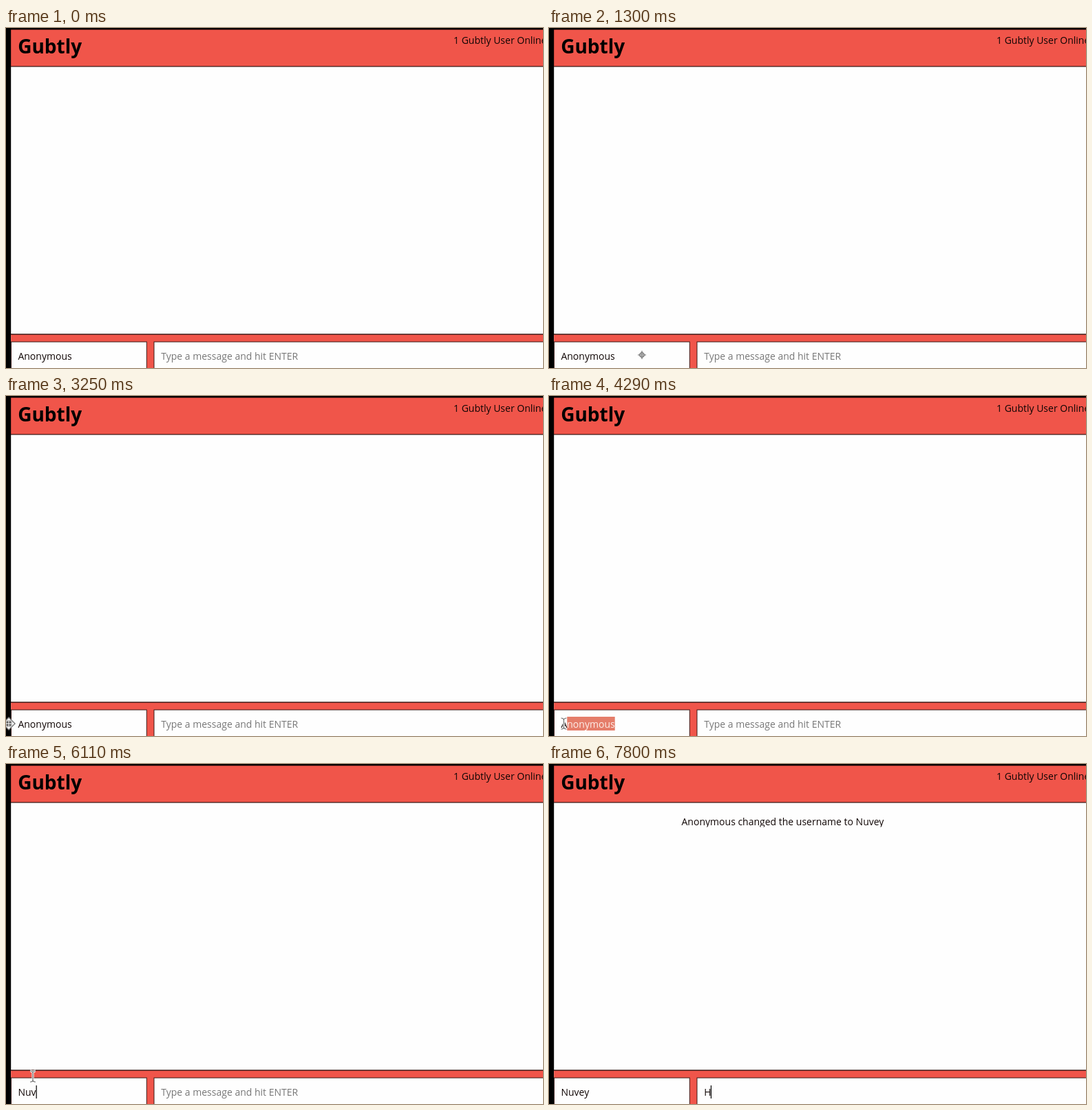
An HTML page that plays this animation: 780 px wide and 494 px high, repeating every 8000 ms.

```html
<!DOCTYPE html>
<html lang="en">
<head>
<meta charset="utf-8">
<title>Chat demo</title>
<style>
  html, body { margin: 0; width: 100%; height: 100%; overflow: hidden; background: #000; }
  svg { display: block; width: 780px; height: 494px; }
  text { font: 14px "Open Sans", "Noto Sans", sans-serif; fill: #100605; white-space: pre; }
  .title { font-size: 28px; font-weight: 700; fill: #000; }
  .hint { fill: #777; }
  .picked { fill: #fdeee9; }
  .bar { fill: #f0554a; }
  .rule { stroke: #3b1a17; stroke-width: 1.4; }
  .field { fill: #fefefe; stroke: #3b1a17; }
  .halo { fill: none; stroke: #fff; stroke-width: 3; }
  .ink { fill: none; stroke: #6b6b6b; stroke-width: 1.2; }
</style>
</head>
<body>
<svg viewBox="0 0 780 494">
  <clipPath id="line"><rect x="180" y="70" width="330" height="21.5"/></clipPath>

  <rect x="7.2" y="56" width="773" height="438" fill="#fefefe"/>
  <rect class="bar" x="7.2" y="2.5" width="773" height="53.5"/>
  <path class="rule" d="M7 55.9H780"/>
  <text class="title" x="17.2" y="36.5">Gubtly</text>
  <text x="650" y="22.5">1 Gubtly User Online</text>

  <text id="notice" x="192.5" y="88.5" clip-path="url(#line)">Anonymous changed the username to Nuvey</text>

  <rect class="bar" x="7.2" y="445" width="773" height="49"/>
  <path class="rule" d="M7 445H780"/>
  <rect class="field" x="7.5" y="456" width="196.8" height="60"/>
  <rect class="field" x="215" y="456" width="600" height="60"/>

  <rect id="selection" y="466" height="20" fill="#e57d6a"/>
  <text id="name" x="17.4" y="481.7"><tspan id="plain"></tspan><tspan id="picked" class="picked"></tspan></text>
  <text id="message" x="225.2" y="481.7"></text>
  <rect id="caret" y="467" width="1.2" height="19" fill="#000"/>

  <g id="cross">
    <path class="ink" d="M-6 0H6M0 -6V6"/>
    <circle class="ink" r="3.2"/>
  </g>
  <g id="move">
    <path d="M0 -10L10 0L0 10L-10 0Z" fill="#777"/>
    <path d="M0 -8L3 -5H-3ZM0 8L3 5H-3ZM-8 0L-5 -3V3ZM8 0L5 -3V3Z" fill="#fff"/>
    <path d="M-4 -4H4V4H-4Z" fill="#555" stroke="#fff"/>
    <path d="M-4 0H4M0 -4V4" stroke="#fff"/>
  </g>
  <g id="beam">
    <path class="halo" d="M-4 -8Q0 -8 0 -5Q0 -8 4 -8M0 -5V5M-4 8Q0 8 0 5Q0 8 4 8"/>
    <path class="ink" d="M-4 -8Q0 -8 0 -5Q0 -8 4 -8M0 -5V5M-4 8Q0 8 0 5Q0 8 4 8"/>
  </g>
</svg>
<script>
const LOOP = 8000, STEP = 130, NAME_X = 17.4, MESSAGE_X = 225;
const OLD_NAME = "Anonymous", NEW_NAME = "Nuvey", HINT = "Type a message and hit ENTER";
const $ = id => document.getElementById(id);
const show = (el, on) => el.setAttribute("visibility", on ? "visible" : "hidden");

// Pointer path: time, x, y, shape ("" hides it)
const path = [
  [0, 300, 510, ""], [520, 300, 510, "cross"], [1300, 135, 475, "cross"],
  [1560, 135, 475, "cross"], [1950, 108, 476, "cross"], [2730, 108, 476, "cross"],
  [3250, 4, 476, "move"], [3380, 4, 476, "beam"], [3770, 97, 476, "beam"],
  [4290, 21.5, 476, "beam"], [4680, 15, 476, "beam"], [5070, 15, 476, ""],
  [5850, 20, 476, "beam"], [6110, 39, 454, "beam"], [6240, 39, 454, ""]
];

function pointerAt(t) {
  const i = path.findLastIndex(p => p[0] <= t);
  const a = path[i], b = path[i + 1] || a;
  const k = b === a ? 0 : (t - a[0]) / (b[0] - a[0]);
  return { x: a[1] + (b[1] - a[1]) * k, y: a[2] + (b[2] - a[2]) * k, shape: a[3] };
}

const typed = t => NEW_NAME.slice(0, Math.max(0, Math.floor((t - 5850) / STEP) + 1));
const widthOf = (el, n) => n ? el.getSubStringLength(0, n) : 0;

function setText(el, value) {
  if (el.textContent !== value) el.textContent = value;
}

function drawName(t, pointer) {
  const name = $("name"), box = $("selection");
  const text = t < 5070 ? OLD_NAME : typed(t);
  let from = text.length;
  setText($("plain"), text);
  setText($("picked"), "");
  if (t >= 3770 && t < 5070) {
    // A letter joins the selection once the pointer is well past its middle
    const edge = n => NAME_X + widthOf(name, n - 1) * 0.6 + widthOf(name, n) * 0.4;
    from = 0;
    while (from < text.length && edge(from + 1) < pointer.x) from++;
  }
  const start = widthOf(name, from), end = widthOf(name, text.length);
  box.setAttribute("x", NAME_X + start);
  box.setAttribute("width", end - start);
  setText($("plain"), text.slice(0, from));
  setText($("picked"), text.slice(from));
  return NAME_X + end;
}

function render(now) {
  const t = Math.floor(now % LOOP / STEP) * STEP;
  const pointer = pointerAt(t);
  const nameEnd = drawName(t, pointer);

  const message = $("message"), sent = t >= 7800;
  setText(message, sent ? "H" : HINT);
  message.setAttribute("class", sent ? "" : "hint");
  show($("notice"), t >= 6890);

  const inMessage = t >= 6890;
  const blinkOff = t >= 5590 && t < 5850 || t >= 6760 && t < 6890 || t >= 7410 && t < 7800;
  $("caret").setAttribute("x", inMessage ? MESSAGE_X - 0.5 + (sent ? widthOf(message, 1) : 0) : nameEnd);
  show($("caret"), t >= 5070 && !blinkOff);

  for (const shape of ["cross", "move", "beam"]) {
    show($(shape), shape === pointer.shape);
    $(shape).setAttribute("transform", `translate(${pointer.x} ${pointer.y})`);
  }
}

function tick(now) {
  render(now);
  requestAnimationFrame(tick);
}
render(0);
requestAnimationFrame(tick);
</script>
</body>
</html>
```
